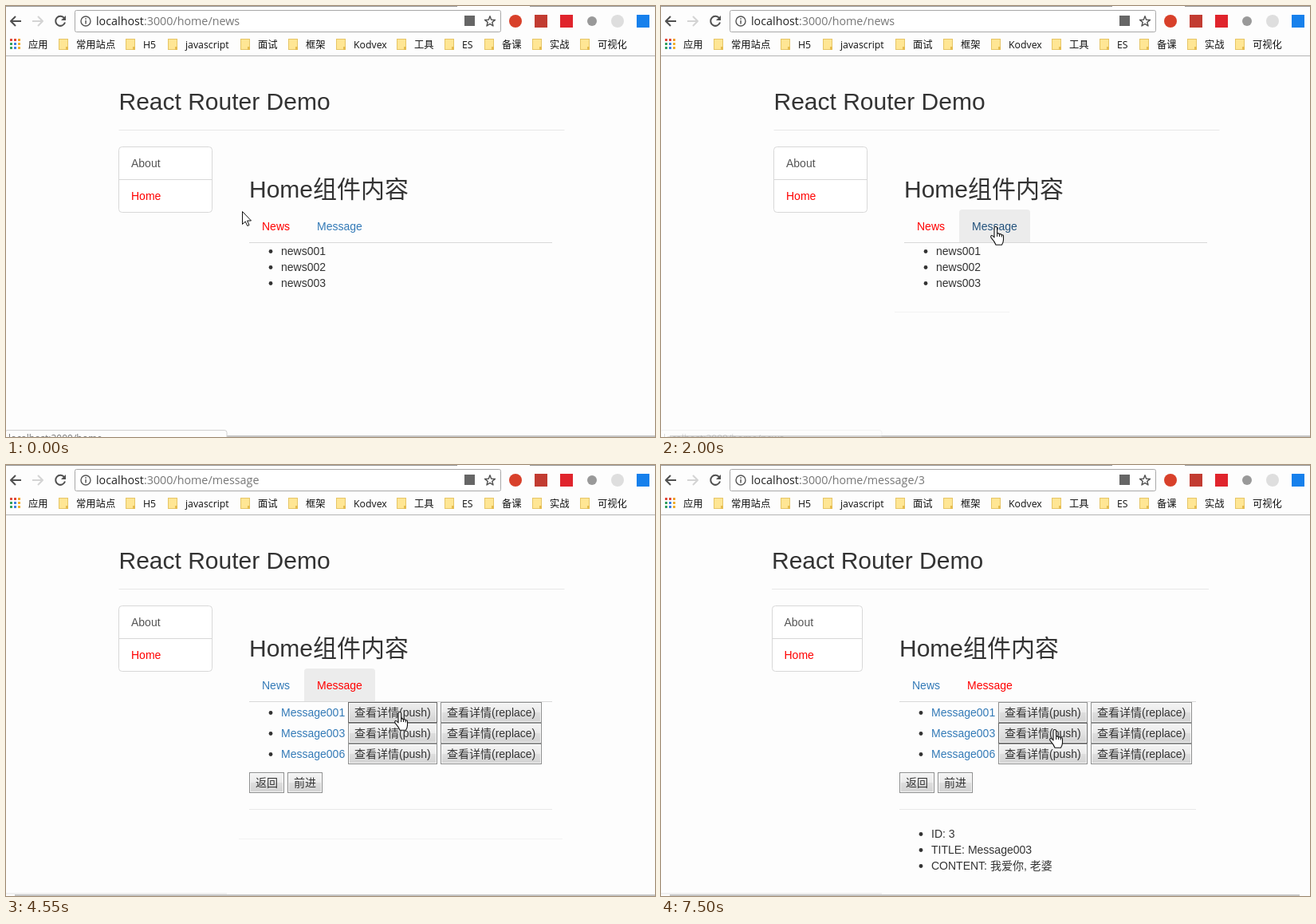
Animation of 814 by 540 pixels, one loop 8000 ms. Source, as an HTML page:

```html
<!DOCTYPE html>
<html lang="zh">
<head>
<meta charset="utf-8">
<title>React Router Demo</title>
<style>
html, body { margin: 0; width: 100%; height: 100%; overflow: hidden; background: #fdfdfd; }
svg { display: block; width: 814px; height: 540px; }
text { font: 14px "Liberation Sans", "Noto Sans CJK SC", "Noto Sans CJK", sans-serif; fill: #333; white-space: pre; }
text.big { font-size: 30px; }
text.url { font: 14.3px "Open Sans", "Noto Sans", sans-serif; fill: #777; }
text.mark { font: 12.3px "Open Sans", "Noto Sans CJK SC", "Noto Sans CJK", sans-serif; fill: #111; }
text.tip { font: 12px "Open Sans", "Noto Sans", sans-serif; fill: #777; }
</style>
</head>
<body>
<svg id="stage" viewBox="0 0 814 540">
  <defs>
    <linearGradient id="face" x2="0" y2="1">
      <stop offset="0" stop-color="#f4f4f4"/><stop offset=".48" stop-color="#ebebeb"/>
      <stop offset=".52" stop-color="#dedede"/><stop offset="1" stop-color="#d2d2d2"/>
    </linearGradient>
    <linearGradient id="faceHot" x2="0" y2="1">
      <stop offset="0" stop-color="#eee"/><stop offset=".5" stop-color="#e2e2e2"/>
      <stop offset="1" stop-color="#d0d0d0"/>
    </linearGradient>
  </defs>
  <g id="page"></g>
  <g id="chrome"></g>
  <g id="cursor"></g>
</svg>
<script>
const LOOP = 8000;
const RED = '#f00', BLUE = '#337ab7';
const el = id => document.getElementById(id);

// Each step changes only the listed properties.
const steps = [
  [0, { path: 'news', tab: 'News', hover: '', cur: 'arrow', x: 296, y: 257, tip: '', tipOn: 1, tint: 0,
        rest: 0, list: 'news', hot: -1, down: -1, id: 0, edge: 0 }],
  [120, { x: 316, hover: 'News', cur: 'hand' }],
  [240, { x: 333, y: 260, tip: '/news', tint: 1, edge: 372 }],
  [390, { x: 335, y: 268 }],
  [520, { x: 338, y: 277 }],
  [640, { x: 340, y: 284 }],
  [1050, { x: 346, y: 284 }],
  [1170, { x: 362, y: 312, cur: 'arrow', hover: '' }],
  [1290, { x: 376, y: 336, tipOn: .6, edge: 388 }],
  [1440, { x: 400, y: 342, tipOn: .25 }],
  [1570, { x: 425, y: 334, tipOn: 0, tint: 0, edge: 437 }],
  [1720, { x: 418, y: 293, cur: 'hand' }],
  [1870, { x: 425, y: 233, cur: 'arrow' }],
  [2000, { x: 413, y: 276, cur: 'hand', hover: 'Message', tipOn: .25 }],
  [2160, { path: 'message', tab: 'Message', list: '', tip: '/message', tipOn: 1, tint: 1, edge: 0 }],
  [2450, { x: 439, y: 303, cur: 'arrow' }],
  [2600, { x: 425, y: 339 }],
  [2850, { tipOn: .4 }],
  [2980, { tipOn: 0, rest: 1 }],
  [3100, { list: 'message', cur: 'beam', x: 424, y: 332, edge: 698 }],
  [4280, { y: 330 }],
  [4420, { cur: 'hand', x: 470, y: 308, hot: 0 }],
  [4550, { x: 487, y: 309 }],
  [5330, { hover: '', down: 0 }],
  [5600, { id: 1, path: 'message/1', down: -1, edge: 0 }],
  [5900, { y: 322 }],
  [6060, { y: 328, hot: 1 }],
  [6190, { y: 331 }],
  [7350, { down: 1 }],
  [7500, { id: 3, path: 'message/3', down: -1 }]
];

const rect = (x, y, w, h, fill, more = '') =>
  `<rect x="${x}" y="${y}" width="${w}" height="${h}" fill="${fill}" ${more}/>`;
const text = (x, y, s, cls = '', fill = '') =>
  `<text x="${x}" y="${y}" class="${cls}"${fill ? ` style="fill:${fill}"` : ''}>${s}</text>`;
const line = (x1, x2, y, color) => rect(x1, y, x2 - x1, 1, color);
const path = (d, fill, stroke, w = 1) =>
  `<path d="${d}" fill="${fill}" stroke="${stroke}" stroke-width="${w}" stroke-linejoin="round"/>`;
const dot = (x, y, r, fill) => `<circle cx="${x}" cy="${y}" r="${r}" fill="${fill}"/>`;

function button(x, y, w, label, hot, down) {
  return rect(x + .5, y + .5, w - 1, 25, down ? '#d4d4d4' : hot ? 'url(#faceHot)' : 'url(#face)',
      `stroke="${hot ? '#666' : '#8e8f8f'}"`) +
    rect(x + 1.5, y + 1.5, w - 3, 23, 'none', `stroke="#fff" stroke-opacity="${down ? .2 : .75}"`) +
    text(x + 8, y + 18, label);
}

function item(x, mid, label, fill) {
  return dot(x - 13, mid + .5, 2.4, '#333') + text(x, mid + 5, label, '', fill);
}

function tab(x, w, name, s) {
  const on = s.hover === name;
  const shape = on ? path(`M${x} 296.5V259q0-4 4-4H${x + w - 4}q4 0 4 4V296.5Z`, '#ececec', 'none') : '';
  return shape + text(x + 16, 281, name, '', s.tab === name ? RED : on ? '#23527c' : BLUE);
}

function status(s) {
  const bar = rect(-1, 531.5, 278, 12, '#fdfdfd', 'rx="3" stroke="#d0d0d0"') +
    (s.tint ? rect(121, 532, 156, 8, '#f2f2f2') : '') +
    text(3, 545.5, 'localhost:3000/home' + s.tip, 'tip');
  return (s.rest ? rect(0, 536, 277, 2, '#f0f0f0') : '') +
    (s.tipOn ? `<g opacity="${s.tipOn}">${bar}</g>` : '');
}

function drawPage(s) {
  const slim = s.id > 0;
  const left = slim ? 139 : 141.5, right = slim ? 687 : 700.5;
  const x = slim ? 299 : 305, end = slim ? 671 : 685;
  const boxL = slim ? 139.5 : 141.5, boxR = slim ? 252.5 : 258.5;
  let out = text(left, 130, 'React Router Demo', 'big') + line(left, right, 155, '#e8e8e8') +
    rect(boxL, 176.5, boxR - boxL, 82, '#fff', 'rx="4" stroke="#d8d8d8"') +
    line(boxL, boxR, 217, '#d8d8d8') +
    text(left + 15.5, 202, 'About', '', '#555') + text(left + 15.5, 243, 'Home', '', RED) +
    text(x, 240, 'Home组件内容', 'big') +
    tab(x, 67, 'News', s) + tab(x + 69, 89, 'Message', s) + line(x, end, 296, '#d8d8d8');

  if (s.list === 'news') {
    [1, 2, 3].forEach((n, i) => out += item(x + 40, 307 + i * 20, 'news00' + n));
    if (s.edge) out += line(293, s.edge, 383, '#f2f2f2');
  } else {
    const rows = s.list ? [1, 3, 6] : [];
    const y = s.list ? 385 : 307;
    rows.forEach((n, i) => {
      const top = 297 + i * 26;
      out += item(x + 40, top + 13, 'Message00' + n, BLUE) +
        button(x + 124, top, 112, '查看详情(push)', s.hot === i, s.down === i) +
        button(x + 240, top, 127, '查看详情(replace)');
    });
    out += button(x, y, 44, '返回') + button(x + 48, y, 44, '前进') + line(x, end, y + 46, '#e8e8e8');
    if (s.edge) out += line(292, s.edge, 468, '#f2f2f2');
  }
  if (slim) {
    const lines = ['ID: ' + s.id, 'TITLE: Message00' + s.id, 'CONTENT: 我爱你, ' + (s.id === 1 ? '中国' : '老婆')];
    lines.forEach((v, i) => out += item(x + 40, 462 + i * 20, v));
  }
  return out + rect(11, 538, (slim ? 801 : 814) - 11, 2, '#c6c6c6') + status(s);
}

function drawChrome(s) {
  let out = rect(0, 0, 814, 62, '#fdfdfd') + line(0, 566, 0, '#999') + line(657, 814, 0, '#999') +
    line(0, 814, 62, '#b4b4b4') +
    path('M19 19H6M12 13L6 19L12 25', 'none', '#505050', 2) +
    path('M33 19H46M40 13L46 19L40 25', 'none', '#d4d4d4', 2) +
    path('M73 15.2A6 6 0 1 0 74 20.5', 'none', '#505050', 2) + path('M75 12V18H69Z', '#505050', 'none') +
    rect(86.5, 5.5, 534, 27, '#fff', 'rx="2" stroke="#a8a8a8"') +
    `<circle cx="100" cy="19" r="6" fill="none" stroke="#555" stroke-width="1.4"/>` +
    rect(99.3, 18, 1.5, 4.5, '#555') + rect(99.3, 15.3, 1.5, 1.6, '#555') +
    text(113, 24, `<tspan fill="#222" style="fill:#222">localhost</tspan>:3000/home/${s.path}`, 'url') +
    rect(575, 12, 13, 13, '#666');

  const star = Array.from({ length: 10 }, (_, i) => {
    const r = i % 2 ? 2.9 : 6.8, a = i * Math.PI / 5;
    return (607 + r * Math.sin(a)).toFixed(1) + ' ' + (19.5 - r * Math.cos(a)).toFixed(1);
  });
  out += path('M' + star.join('L') + 'Z', 'none', '#505050', 1.4) +
    dot(639, 19, 8, '#d8402a') + rect(663, 11, 16, 16, '#c23b31') + rect(695, 11, 16, 16, '#e0242c') +
    dot(735, 19, 6, '#999') + dot(767, 19, 8, '#dedede') + rect(791, 11, 16, 16, '#1680ec');

  const hues = ['#e04a3a', '#e04a3a', '#f0a030', '#35a060', '#4080e0', '#f0b030', '#35a060', '#4080e0', '#f0b030'];
  hues.forEach((c, i) => out += rect(5 + i % 3 * 5, 41 + Math.floor(i / 3) * 5, 3, 3, c));
  out += text(28, 53, '应用', 'mark');
  const marks = [[66, '常用站点'], [150, 'H5'], [203, 'javascript'], [294, '面试'], [354, '框架'], [414, 'Kodvex'],
    [490, '工具'], [550, 'ES'], [600, '备课'], [660, '实战'], [720, '可视化']];
  for (const [x, name] of marks) {
    out += rect(x + .5, 41.5, 11, 13, '#ffe694', 'stroke="#e6c566"') + rect(x + 9, 51, 3, 4, '#e6bd50') +
      text(x + 22, 53, name, 'mark');
  }
  return out;
}

const cursors = {
  arrow: path('M.5.5V16.5L4.2 13L6.8 18.5L9 17.5L6.6 12H11.5Z', '#fff', '#111'),
  hand: path('M5 14V2.3a1.8 1.8 0 0 1 3.6 0V9.3q2-1 2.9.6q2-.8 2.7.9q2.3-.4 2.3 1.4V17q0 3-2 6.2H7Q5.4 19 1.3 14.6' +
    'Q-.1 12.3 1.6 11.6Q3 11.2 5 14Z', '#fff', '#111', 1.1) +
    path('M8.6 9.5V13M11.5 10V13M14.2 11V13.5', 'none', '#111'),
  beam: path('M.5.5H2.5L3.5 1.5L4.5.5H6.5M3.5 1.5V14.5M.5 15.5H2.5L3.5 14.5L4.5 15.5H6.5', 'none', '#111')
};

let last = -1;
function frame() {
  const t = performance.now() % LOOP;
  const n = steps.filter(([at]) => at <= t).length;
  if (n !== last) {
    last = n;
    const s = Object.assign({}, ...steps.slice(0, n).map(v => v[1]));
    el('page').innerHTML = drawPage(s);
    el('chrome').innerHTML = drawChrome(s);
    el('cursor').innerHTML = cursors[s.cur];
    el('cursor').setAttribute('transform', `translate(${s.x} ${s.y})`);
  }
  requestAnimationFrame(frame);
}
frame();
</script>
</body>
</html>
```
